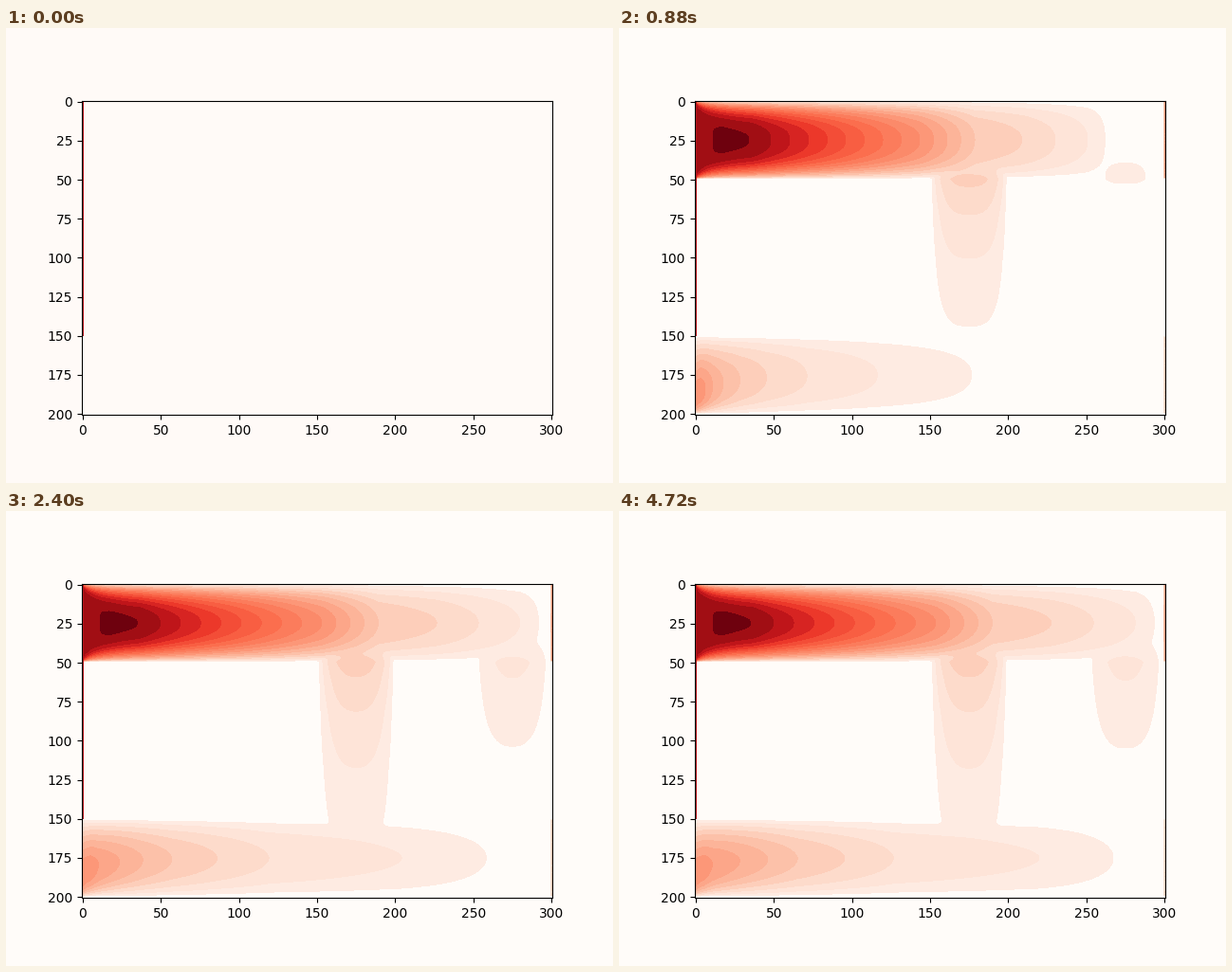
These frames come from a looping animation (640 px wide and 480 px high, 4.8 s). A matplotlib script:

```python
import numpy as np
import matplotlib.pyplot as plt
from matplotlib.animation import FuncAnimation
from matplotlib.colors import BoundaryNorm, ListedColormap
from matplotlib.patches import Rectangle

FRAMES, INTERVAL = 60, 80
BANDS = 18

y, x = np.mgrid[0:201, 0:301].astype(float)
xs, ys = x[0], y[:, 0]

top_levels = np.arange(1, BANDS + 1)
top_rest = np.interp(top_levels, [1, 2, 4, 5, 9, 18],
                     [294, 282, 228, 190, 154, 37])
low_levels = np.arange(1, 9)
low_rest = np.interp(low_levels, [1, 2, 3, 5, 8], [269, 223, 128, 67, 11])


def front(rest, speed, t):
    """Each level runs at its own speed, then eases into its resting place."""
    run = speed * max(t, 1e-3)
    return (rest ** -3.0 + run ** -3.0) ** (-1 / 3)


def along(pos, tips, peak):
    """Strength that falls by one level at each tip, starting from a peak."""
    xp = [tips[-1] / 2, *tips[::-1], tips[0] * 1.06 + 2]
    fp = [peak, *range(len(tips), -1, -1)]
    return np.interp(pos, xp, fp)


def profile(s, n):
    """Flow across a channel: 1 on the axis, 0 at the walls."""
    return np.clip(1 - np.abs(s) ** n, 0, None) ** 0.7


def top_channel(t, power):
    tips = front(top_rest, 37.6 - 1.65 * top_levels, t)
    strength = along(xs, tips, 18.3)
    strength -= 0.9 * np.exp(-xs / 10) * np.clip((t - 3) / 4, 0, 1)
    return strength * profile((y - 25) / 25, power + 35 / (x + 1))


def bottom_channel(t, power):
    tips = front(low_rest, 29 * 0.62 ** low_levels, t)
    shift = 5 + 13 * np.exp(-t / 8 + 0.375)
    axis = 175 + shift * np.exp(-x / 25)
    above = y < axis
    s = np.where(above, (axis - y) / (axis - 150), (y - axis) / (200 - axis))
    n = np.where(above,
                 power - (power - 1.3) * np.exp(-x / 15),
                 power + 12 / (x + 3))
    return along(xs, tips, 8.6) * profile(s, n)


def duct(tips, peak, center, n):
    """Branch, 50 wide, that leaves the top channel downwards."""
    strength = along(ys - 25, tips, peak) * np.clip((ys - 25) / 25, 0, 1)
    return strength[:, None] * profile((x - center) / 25, n)


def flow(t):
    if t == 0:
        return np.zeros_like(x)
    fast = np.exp(-t / 4)
    power = 1.9 + 5 * fast
    k = np.arange(1, 5)
    mid = front(250 * 0.61 ** k, 32 * 0.66 ** k, t - 4)
    end = front(175 * 0.46 ** k[:2], 29 * 0.33 ** k[:2], t - 8)
    parts = [
        top_channel(t, power),
        bottom_channel(t, power),
        duct(mid, 5, 175, 2.6 + 8 * fast),
        duct(end, 2.4, 275, 2.4),
    ]
    field = sum(np.clip(p, 0, None) ** 6 for p in parts) ** (1 / 6)
    field[1:50, -1] = 8
    field[151:200, -1] = 4
    return np.clip(field, 0, BANDS + 0.9)


shades = (0.012 + 0.043 * top_levels
          + 0.0055 * np.clip(top_levels - 12, 0, None) ** 2)
cmap = ListedColormap(plt.cm.Reds(shades))
cmap.set_under((1, 1, 1, 0))
norm = BoundaryNorm(np.arange(1, BANDS + 2), BANDS)

fig, ax = plt.subplots(figsize=(6.4, 4.8), dpi=100)
ax.set_facecolor("none")
image = ax.imshow(flow(0), cmap=cmap, norm=norm, interpolation="bilinear",
                  interpolation_stage="data")
ax.set_xticks(range(0, 301, 50))
ax.set_yticks(range(0, 201, 25))
ax.add_patch(Rectangle((-0.5, -0.5), 1, 150.5, lw=0,
                       facecolor=plt.cm.Reds(0.8)))


def update(t):
    fig.set_facecolor("#fffaf7" if t < 5 else "#fffcf9")
    image.set_data(flow(t))
    return [image]


anim = FuncAnimation(fig, update, frames=FRAMES, interval=INTERVAL,
                     init_func=lambda: update(0), repeat=True,
                     repeat_delay=0, blit=False)
plt.show()
```
